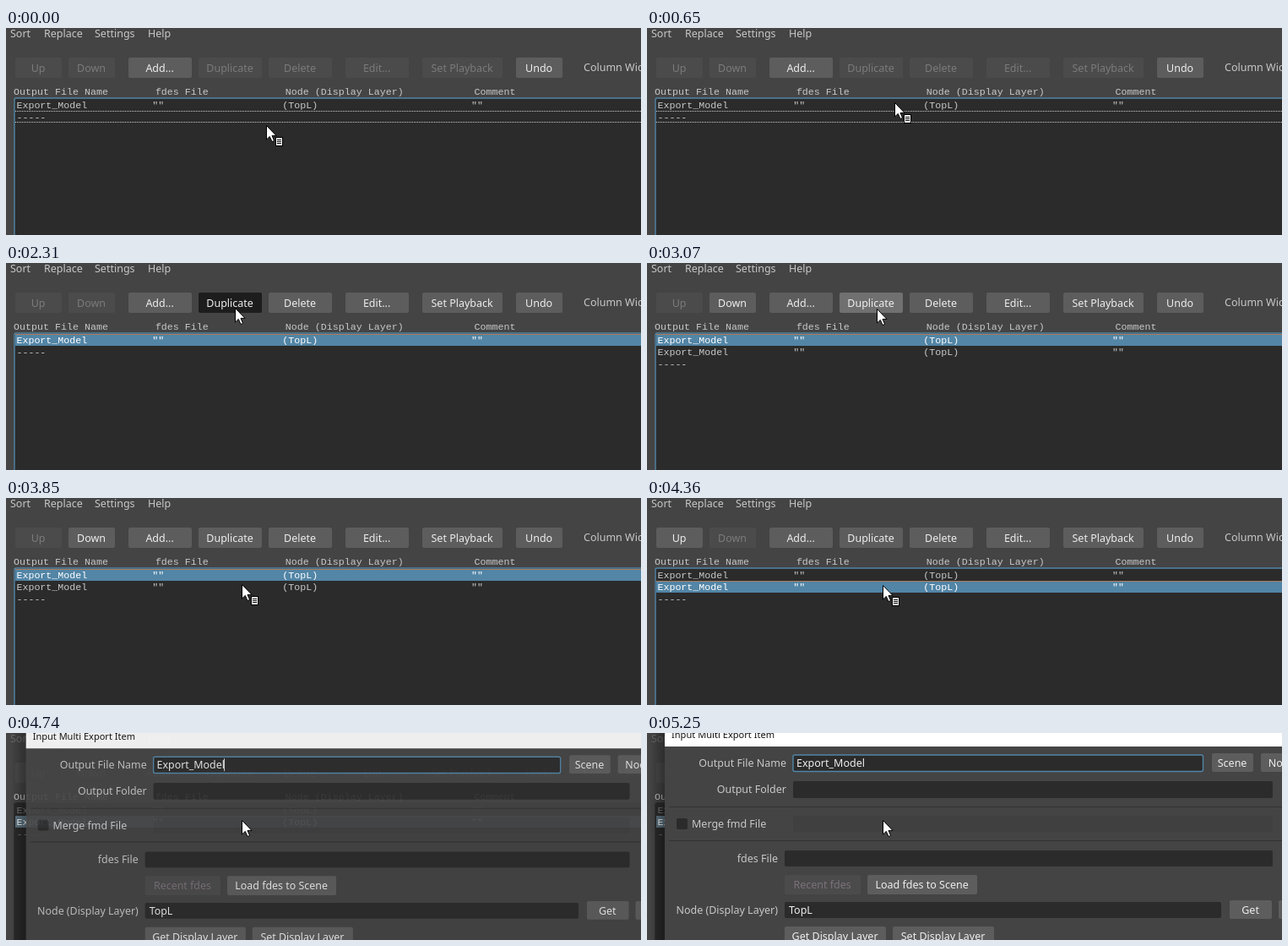
An HTML page that plays this animation: 752x245 px, repeating every 5.5 s.

```html
<!DOCTYPE html>
<html lang="en">
<head>
<meta charset="utf-8">
<title>Multi export list</title>
<style>
  html, body { margin: 0; width: 100%; height: 100%; overflow: hidden; background: #444; }
  svg { display: block; width: 752px; height: 245px; }
  text { font: 12.5px "Noto Sans", "Open Sans", sans-serif; white-space: pre; }
  .mono { font: 11.665px "Liberation Mono", "Courier New", monospace; }
  .title { font-size: 11.1px; }
</style>
</head>
<body>
<svg id="stage" viewBox="0 0 752 245" xmlns="http://www.w3.org/2000/svg"></svg>
<script>
const LOOP = 5500;
const stage = document.getElementById('stage');
const C = { panel: '#444', field: '#2b2b2b', button: '#5d5d5d', hover: '#707070', pressed: '#1d1d1d',
  off: '#4b4b4b', offText: '#7b7b7b', label: '#c8c8c8', bright: '#eee', blue: '#5285a6' };

// Event times in ms
const T = { pick: 1030, enable: 1160, press: 2310, copy: 2440, pickCopy: 4230, enableUp: 4360,
  lock: 4610, fade: 4740, open: 4870, caretOff: 5250 };

// Pointer positions, each held until the next: [time, x, y]
const pointerPath = [
  [0, 308, 115], [130, 306, 111], [260, 302, 104], [390, 297, 96], [520, 294, 90], [650, 293, 88],
  [1540, 281, 72], [1670, 276, 63], [1800, 273, 57], [1930, 272, 54], [2060, 271, 53],
  [3070, 272, 54], [3200, 273, 61], [3330, 275, 73], [3460, 278, 86], [3590, 279, 95],
  [3720, 279, 99], [3850, 279, 102], [3980, 279, 103]
];

const rect = (x, y, w, h, fill, extra = '') =>
  `<rect x="${x}" y="${y}" width="${w}" height="${h}" fill="${fill}" ${extra}/>`;
const text = (x, y, s, fill = C.label, extra = '') =>
  `<text x="${x}" y="${y}" fill="${fill}" ${extra}>${s}</text>`;
const mono = (x, y, s, fill) => text(x, y, s, fill, 'class="mono"');
const line = (y, x, color, dash = '') =>
  `<path d="M${x} ${y + .5}H800" stroke="${color}" stroke-dasharray="${dash}"/>`;
const field = (x, y, w, h, fill = C.field) => rect(x, y, w, h, fill, 'rx="2"');
const framed = (x, y, w, h, stroke) =>
  rect(x, y, w, h, C.field, `rx="2" stroke="${stroke}" stroke-width="1.4"`);
const columns = (...cells) => cells.map((s, i) => s.padEnd([23, 22, 32, 0][i])).join('');

function button(x, y, w, h, s, { on = true, fill = C.button, offText = C.offText } = {}) {
  return rect(x, y, w, h, on ? fill : C.off, 'rx="2"') +
    text(x + w / 2 - .4, y + h / 2 + 4.7, s, on ? C.bright : offText, 'text-anchor="middle"');
}

function toolbar(t, pointer) {
  const locked = t >= T.lock;
  const some = t >= T.enable && !locked;
  const second = t >= T.enableUp;
  const over = pointer.x >= 228 && pointer.x < 303 && pointer.y < 59;
  const duplicateFill = t >= T.press && t < T.copy ? C.pressed : over ? C.hover : C.button;
  return [
    [11, 55, 'Up', second && !locked],
    [74, 55, 'Down', t >= T.copy && !second],
    [145, 75, 'Add...', !locked],
    [228, 75, 'Duplicate', some, duplicateFill],
    [311, 75, 'Delete', some],
    [402, 75, 'Edit...', some],
    [493, 95, 'Set Playback', some],
    [604, 55, 'Undo', !locked]
  ].map(([x, w, s, on, fill]) => button(x, 35, w, 24, s, { on, fill })).join('');
}

function list(t) {
  const locked = t >= T.lock;
  const item = columns('Export_Model', '""', '(TopL)', '""');
  const rows = t < T.copy ? [item, '-----'] : [item, item, '-----'];
  const selected = t < T.pick ? -1 : t < T.pickCopy ? 0 : 1;
  let out = framed(10, 83, 800, 200, locked ? C.field : C.blue);
  rows.forEach((s, i) => {
    const y = 84 + 14 * i;
    const active = i === selected;
    if (active) out += rect(11, y, 800, 14, locked ? '#5d7482' : C.blue);
    if (active && !locked) out += line(y, 11, '#ad7a59');
    out += mono(12.4, y + 11, s, active ? '#fff' : locked ? '#777' : C.label);
  });
  if (selected < 0) out += line(98, 11, '#ccc', '1 1') + line(111, 11, '#ccc', '1 1');
  return out;
}

function mainWindow(t, pointer) {
  const menuColor = t >= T.lock ? '#6b6b6b' : C.label;
  const menu = [[5, 'Sort'], [45, 'Replace'], [105, 'Settings'], [168, 'Help']];
  return rect(0, 0, 752, 245, C.panel) +
    menu.map(([x, s]) => text(x, 11, s, menuColor)).join('') +
    toolbar(t, pointer) +
    text(684, 51, 'Column Width', menuColor) +
    mono(9, 79, 'Output File Name'.padEnd(24) + 'fdes File'.padEnd(22) + 'Node (Display Layer)'.padEnd(32) + 'Comment', C.label) +
    list(t);
}

function dialog(t) {
  if (t < T.fade) return '';
  const opening = t < T.open;
  const scale = opening ? .9928 : 1;
  const label = (x, y, s) => text(x, y, s, C.label, 'text-anchor="end"');
  const caret = t < T.caretOff ? rect(257, 28, 1, 15, '#ddd') : '';
  return `<g opacity="${opening ? .91 : 1}" transform="translate(400 330) scale(${scale}) translate(-400 -330)">` +
    '<linearGradient id="shade"><stop stop-opacity="0"/><stop offset="1" stop-opacity=".35"/></linearGradient>' +
    rect(3, -20, 18, 300, 'url(#shade)') +
    rect(21, -20, 800, 300, C.panel) +
    rect(21, -20, 800, 36, '#fff') +
    text(29, 5.5, 'Input Multi Export Item', '#111', 'class="title"') +
    label(165, 40, 'Output File Name') +
    framed(173, 26, 485.5, 19.5, C.blue) +
    text(177, 40, 'Export_Model', C.bright) + caret +
    button(669, 24, 49, 22, 'Scene') + button(727, 24, 50, 22, 'Node') +
    label(165, 71, 'Output Folder') + field(173, 57, 568, 20) +
    line(87, 26, '#323232') +
    field(35, 101, 13, 13) + text(53, 112, 'Merge fmd File') + field(173, 98, 568, 19, '#404040') +
    line(127, 26, '#323232') +
    label(155, 153, 'fdes File') + field(163, 139, 578, 19) +
    button(163, 168, 90, 23, 'Recent fdes', { on: false, offText: '#7b727a' }) +
    button(261, 168, 130, 23, 'Load fdes to Scene') +
    label(155, 214, 'Node (Display Layer)') + field(163, 200, 517, 19) + text(168, 214, 'TopL', C.bright) +
    button(690, 198, 50, 22, 'Get') + button(748, 198, 50, 22, '') +
    button(163, 229, 120, 23, 'Get Display Layer') + button(291, 229, 120, 23, 'Set Display Layer') +
    '</g>';
}

function pointerShape({ x, y }, showSheet) {
  const sheet = rect(11, 14, 9, 11, '#000') + rect(12, 15, 7, 9, '#fff') +
    [17, 19, 21].map(v => rect(13, v, 5, 1, '#000')).join('');
  return `<g transform="translate(${x} ${y})">` +
    '<path d="M.5 .5V17L4.3 13.4L7 19.5L9.6 18.4L7 12.4H12Z" fill="#fff" stroke="#000"/>' +
    (showSheet ? sheet : '') + '</g>';
}

let last = '';
function render(t) {
  const [, x, y] = pointerPath.filter(p => p[0] <= t).pop();
  const pointer = { x, y };
  const markup = mainWindow(t, pointer) + dialog(t) + pointerShape(pointer, y >= 84 && t < T.lock);
  if (markup !== last) stage.innerHTML = last = markup;
}

const start = performance.now();
function tick() {
  render((performance.now() - start) % LOOP);
  requestAnimationFrame(tick);
}
tick();
</script>
</body>
</html>
```
